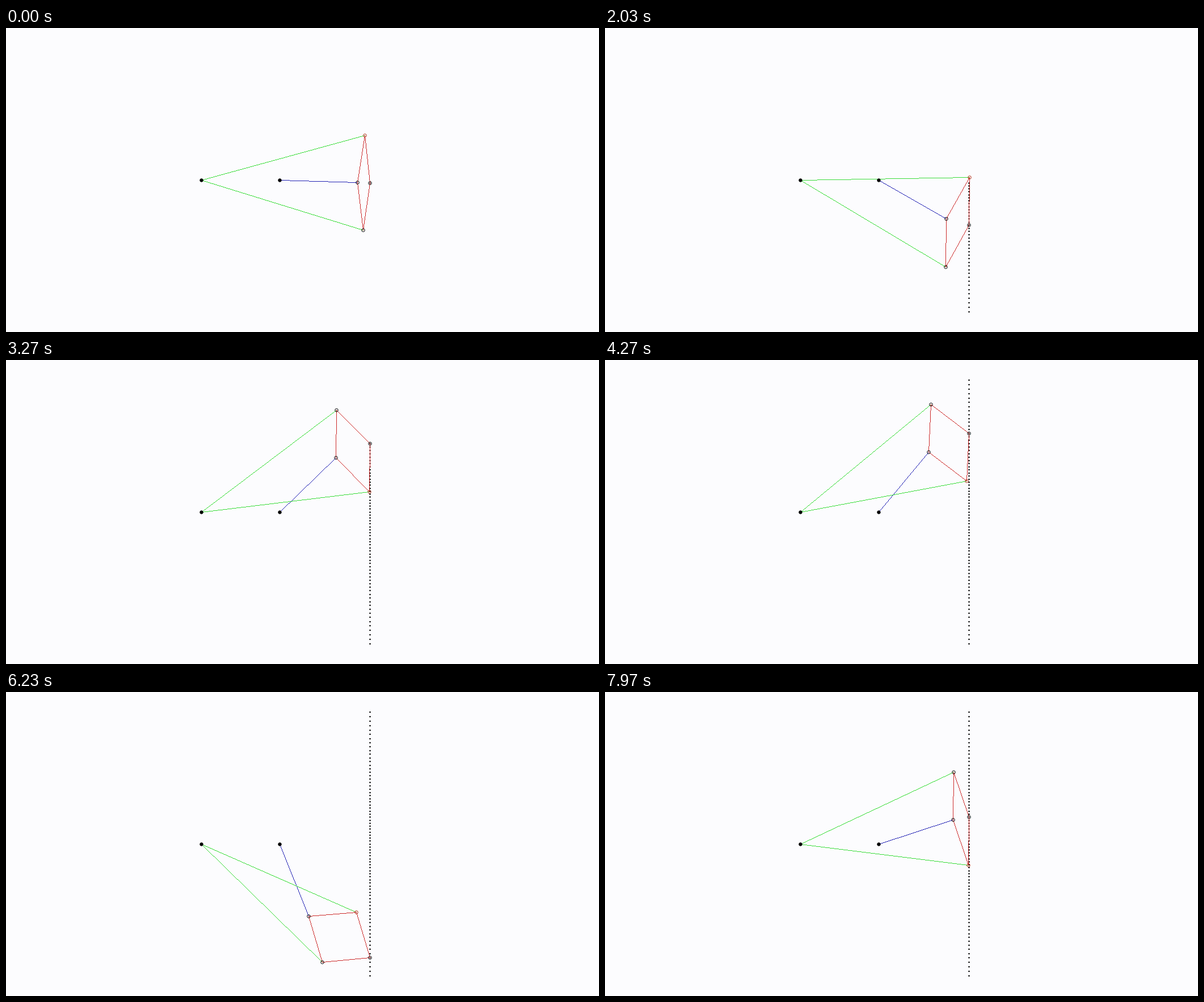
A matplotlib script that plays this animation: 1045x536 px, repeating every 8000 ms.

```python
import numpy as np
import matplotlib.pyplot as plt
from matplotlib.animation import FuncAnimation
from matplotlib.patches import Circle

W, H, DPI = 1045, 536, 64
PX = 72 / DPI                      # points per pixel
TICK_MS, LOOP_MS = 20, 8000
POSES = 240                        # 30 poses per second

BACK = "#fcfcfe"
GREEN, RED, BLUE, BLACK = "#3cdc3c", "#cc2c2c", "#2424b4", "#000000"

# Straight-line linkage, lengths in pixels
CRANK, LONG, SHORT = 137.8, 298.45, 84.2
BASE = np.array([344.3, 268.0])
PIVOT = BASE + [CRANK, 0]
LINE_X = (LONG**2 - SHORT**2) / (2 * CRANK)

STEP, SWING = 2, 38                # degrees per pose, steps to each side


def crank_angle(n):
    """Sweep back and forth, resting one extra pose at each end."""
    span = 2 * SWING + 1
    u = (n + SWING + 1) % (2 * span)
    return np.radians(STEP * (min(u, 2 * span - 1 - u) - SWING))


def polar(angle, length):
    return length * np.array([np.cos(angle), np.sin(angle)])


def tracer(n):
    return BASE + [LINE_X, LINE_X * np.tan(crank_angle(n) / 2)]


def linkage(n):
    """Joints: crank end, inner arm end, outer arm end, tracing point."""
    theta = crank_angle(n)
    phi = theta / 2
    near = 2 * CRANK * np.cos(phi)
    far = LINE_X / np.cos(phi)
    spread = np.arccos((near + far) / 2 / LONG)
    side = 1 if theta >= 0 else -1
    inner = BASE + polar(phi - side * spread, LONG)
    outer = BASE + polar(phi + side * spread, LONG)
    return PIVOT + polar(theta, CRANK), inner, outer, tracer(n)


def dashes(pixels, before=0, after=1):
    """Horizontal strokes, each covering whole pixels of one row."""
    x, y = np.transpose(pixels)
    gap = np.full(len(x), np.nan)
    xs = np.column_stack([x - before, x + after, gap])
    ys = np.column_stack([y + 0.5, y + 0.5, gap])
    return xs.ravel(), ys.ravel()


def stepped(*points):
    """Pixels of an unsmoothed polyline."""
    corners = np.floor(points)
    runs = []
    for p, q in zip(corners, corners[1:]):
        count = int(np.abs(q - p).max()) + 1
        runs.append(np.floor(np.linspace(p, q, count) + 0.5))
    return np.vstack(runs)


plt.rcParams["path.simplify"] = False
fig = plt.figure(figsize=(W / DPI, H / DPI), dpi=DPI, facecolor=BACK)
ax = fig.add_axes([0, 0, 1, 1])
ax.set(xlim=(0, W), ylim=(H, 0))
ax.axis("off")


def stroke(color, z):
    return ax.plot([], [], color=color, lw=PX, snap=False,
                   solid_capstyle="butt", zorder=z)[0]


def joint(edge, face="none"):
    return ax.add_patch(Circle((0, 0), 2.7, ec=edge, fc=face, lw=0.9 * PX,
                               zorder=5))


def place(circle, point):
    circle.set_center(np.floor(point) + 0.5)


trail = [stroke(BLACK, 1) for _ in range(2)]
crank, arms, rhombus = stroke(BLUE, 2), stroke(GREEN, 3), stroke(RED, 4)
joints = [joint(c) for c in (BLACK, "#b03018", BLACK, BLACK)]
for pin in (BASE, PIVOT):
    place(joint(BLACK, BLACK), pin)

path = np.floor([tracer(n) for n in range(POSES)])


def draw(tick):
    n = (tick * TICK_MS + 15) * POSES // LOOP_MS
    end, inner, outer, pen = points = linkage(n)

    # Each trail dot is a three-pixel plus
    dots = np.unique(path[:n + 1], axis=0)
    trail[0].set_data(*dashes(dots, 1, 2))
    trail[1].set_data(*dashes(np.vstack([dots - [0, 1], dots + [0, 1]])))

    crank.set_data(*dashes(stepped(PIVOT, end)))
    arms.set_data(*dashes(stepped(inner, BASE, outer)))
    rhombus.set_data(*dashes(stepped(end, inner, pen, outer, end)))
    for circle, point in zip(joints, points):
        place(circle, point)
    return [*trail, crank, arms, rhombus, *joints]


anim = FuncAnimation(fig, draw, frames=LOOP_MS // TICK_MS, interval=TICK_MS,
                     repeat=True, repeat_delay=0)
plt.show()
```
